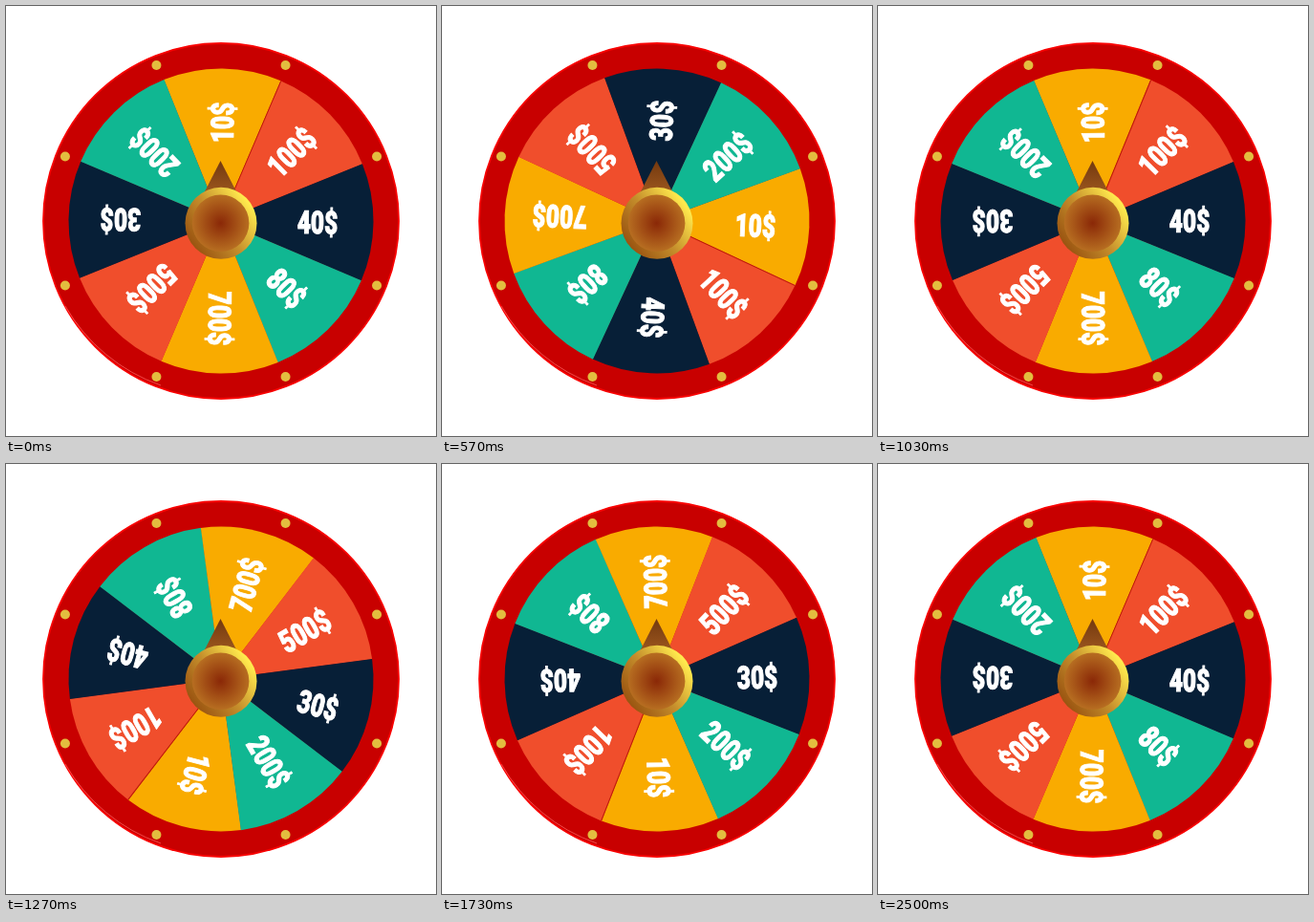
An HTML page for the animation above (2530 ms loop, 450x450 px).

```html
<!DOCTYPE html>
<html lang="en">
<head>
<meta charset="utf-8">
<title>Prize wheel</title>
<style>
  html, body { margin: 0; width: 100%; height: 100%; overflow: hidden; background: #fff; }
  svg { display: block; width: 100vw; height: 100vh; }
  text {
    font: 900 33px Roboto, "Liberation Sans", sans-serif;
    fill: #fff;
    stroke: #fff;
    stroke-width: 1.2;
    text-anchor: middle;
  }
</style>
</head>
<body>
<svg viewBox="0 0 450 450">
  <defs>
    <linearGradient id="gold" x1=".1" y1=".85" x2=".9" y2=".25">
      <stop offset="0" stop-color="#97500f"/>
      <stop offset=".5" stop-color="#c48d2b"/>
      <stop offset="1" stop-color="#ffe94d"/>
    </linearGradient>
    <linearGradient id="bronze" x2="0" y2="1">
      <stop offset="0" stop-color="#74390f"/>
      <stop offset="1" stop-color="#a05a20"/>
    </linearGradient>
    <radialGradient id="copper">
      <stop offset="0" stop-color="#8a2807"/>
      <stop offset="1" stop-color="#b76e21"/>
    </radialGradient>
  </defs>
  <circle cx="225" cy="225" r="186" fill="#c80000" stroke="#f80000" stroke-width="1.8"/>
  <path d="M62 314A186 186 0 0 0 162 397" fill="none" stroke="#ff5a5a" stroke-width=".8"/>
  <g id="studs" fill="#e3bd3f"></g>
  <g id="wheel"></g>
  <path d="M224.5 162L244 200H205Z" fill="url(#bronze)"/>
  <circle cx="225" cy="227.3" r="37.5" fill="url(#gold)"/>
  <circle cx="224.6" cy="227.2" r="29.8" fill="url(#copper)"/>
</svg>
<script>
const CENTER = 225, RADIUS = 159.5, SPIN = 2500, LOOP = 2530, TURN = 1080;
const CONDENSED = 0.74; // horizontal scale of the label typeface
const COLORS = ['#f9ab00', '#f04e2c', '#071f37', '#10b792'];
// label and its distance from the hub, clockwise from the top
const PRIZES = [['10$', 103], ['100$', 103], ['40$', 101], ['80$', 98],
                ['700$', 102], ['500$', 101], ['30$', 105], ['200$', 100]];
const wheel = document.getElementById('wheel');
const studs = document.getElementById('studs');

function add(parent, tag, attrs, text = '') {
  const node = document.createElementNS('http://www.w3.org/2000/svg', tag);
  for (const key in attrs) node.setAttribute(key, attrs[key]);
  node.textContent = text;
  parent.append(node);
}

function polar(degrees, radius) {
  const a = degrees * Math.PI / 180;
  return [CENTER + radius * Math.cos(a), CENTER + radius * Math.sin(a)];
}

PRIZES.forEach(([label, distance], i) => {
  const mid = i * 45 - 90;
  const d = `M225 225L${polar(mid - 22, RADIUS)}A${RADIUS} ${RADIUS} 0 0 1 ${polar(mid + 23.1, RADIUS)}Z`;
  add(wheel, 'path', { d, fill: COLORS[i % 4] });
  add(wheel, 'text', {
    y: 12,
    transform: `translate(225 225) rotate(${mid + 0.6}) translate(${distance} 0) scale(${CONDENSED} 1)`
  }, label);
  const [cx, cy] = polar(mid + 22.5, 176.5);
  add(studs, 'circle', { cx, cy, r: 5 });
});
add(wheel, 'path', { d: `M225 225L${polar(-66.8, RADIUS)}`, stroke: '#bd1a08' });

// cubic-bezier(.5, 0, .5, 1): solve x(u) = p by bisection
function ease(p) {
  let low = 0, high = 1, u;
  for (let i = 0; i < 30; i++) {
    u = (low + high) / 2;
    if (1.5 * u * (1 - u) + u ** 3 < p) low = u; else high = u;
  }
  return u * u * (3 - 2 * u);
}

// the wheel moves in steps at 30 per second, on a 10 ms clock
function draw() {
  const tick = Math.floor(performance.now() % LOOP / 10);
  const step = Math.floor(tick * 0.3 + 0.12);
  const angle = TURN * ease(Math.min(1, step / 30 * 1000 / SPIN));
  wheel.setAttribute('transform', `rotate(${angle} ${CENTER} ${CENTER})`);
  requestAnimationFrame(draw);
}
draw();
</script>
</body>
</html>
```
